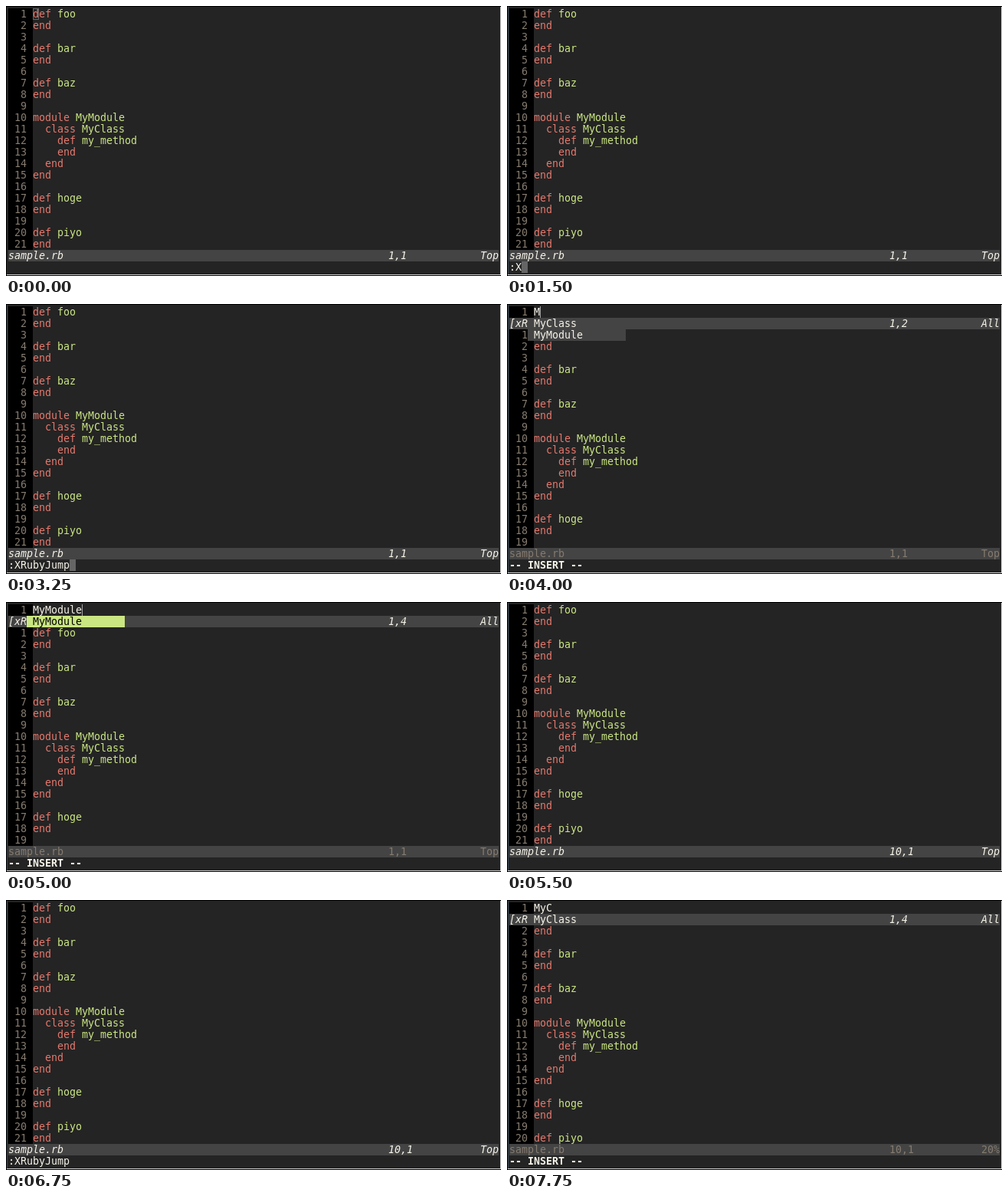
An HTML page with a canvas that plays this animation: 646x352 px, repeating every 8000 ms.

```html
<!DOCTYPE html>
<html lang="en">
<head>
<meta charset="utf-8">
<title>Jump to definition</title>
<style>
  html, body { margin: 0; width: 100%; height: 100%; overflow: hidden; background: #000; }
  canvas { display: block; }
</style>
</head>
<body>
<canvas id="stage" width="646" height="352"></canvas>
<script>
const ctx = document.getElementById('stage').getContext('2d');
const LOOP = 8000;
const CW = 8, CH = 15, PAD = 3, COLS = 80;
const FONT = '10pt "DejaVu Sans Mono", monospace';
const C = {
  bg: '#242424', fg: '#f6f3e8', gutter: '#000', num: '#857b6f', bar: '#444',
  key: '#e5786d', name: '#cae682', cursor: '#656565', beam: '#a5a5a5',
  edge: '#d8d8d8', focus: '#3c4a56', blur: '#2c2c2c'
};

const FILE = `def foo
end

def bar
end

def baz
end

module MyModule
  class MyClass
    def my_method
    end
  end
end

def hoge
end

def piyo
end`.split('\n');

const CMD = ':XRubyJump';

// Normal mode: command line text, cursor visibility, cursor line
const edit = (cmd, on = true, line = 1) => ({ cmd, on, line });
// Jump prompt: typed text, popup items, options
const jump = (text, items = [], opt = {}) =>
  ({ text, items, on: true, line: 1, col: text.length + 1, ...opt });

const STEPS = [
  [0, { ...edit(''), idle: true }],
  [500, edit('')],
  [1000, edit('', false)],
  [1250, edit(':')],
  [1500, edit(':X')],
  [1750, edit(':XR')],
  [2000, edit(':XRu')],
  [2250, edit(':XRub')],
  [2500, edit(':XRubyJ')],
  [2750, edit(':XRubyJum')],
  [3000, edit(CMD, false)],
  [3250, edit(CMD)],
  [3750, jump('')],
  [4000, jump('M', ['MyClass', 'MyModule'])],
  [4250, jump('My', ['MyClass', 'MyModule'])],
  [4500, jump('MyM', ['MyModule'])],
  [4750, jump('MyM', ['MyModule'], { on: false })],
  [5000, jump('MyModule', ['MyModule'], { picked: true, col: 4 })],
  [5250, edit('', true, 10)],
  [5500, edit('', false, 10)],
  [5750, edit(':', true, 10)],
  [6000, edit(CMD, false, 10)],
  [6250, edit(CMD, true, 10)],
  [6750, edit(CMD, false, 10)],
  [7000, jump('', [], { line: 10 })],
  [7250, jump('M', ['MyClass', 'MyModule'], { line: 10 })],
  [7500, jump('My', ['MyClass', 'MyModule'], { line: 10 })],
  [7750, jump('MyC', ['MyClass'], { line: 10, on: false })]
];

const X = col => PAD + col * CW;
const Y = row => PAD + row * CH;

function rect(x, y, w, h, color) {
  ctx.fillStyle = color;
  ctx.fillRect(x, y, w, h);
}

const box = (col, row, w, h, color) => rect(X(col), Y(row), w * CW, h * CH, color);

function print(col, row, text, color, style = '') {
  ctx.font = `${style} ${FONT}`;
  ctx.fillStyle = color;
  [...text].forEach((ch, i) => ch !== ' ' && ctx.fillText(ch, X(col + i), Y(row) + 12));
}

function lineNumber(row, n) {
  print(0, row, String(n).padStart(3), C.num);
}

function code(row, count, first) {
  for (let i = 0; i < count; i++) {
    const n = first + i;
    const [, indent, word, rest] = FILE[n - 1].match(/^( *)(\w*)(.*)$/);
    lineNumber(row + i, n);
    print(4 + indent.length, row + i, word, C.key);
    print(4 + indent.length + word.length, row + i, rest, C.name);
  }
}

function statusBar(row, title, pos, part, active) {
  const color = active ? C.fg : C.num;
  const style = active ? 'italic' : '';
  box(0, row, COLS, 1, C.bar);
  print(0, row, title, color, style);
  print(62, row, pos, color, style);
  print(77, row, part, color, style);
}

function popup(items, picked) {
  items.forEach((item, i) => {
    box(3, 1 + i, 16, 1, picked ? C.name : C.bar);
    print(4, 1 + i, item, picked ? '#000' : C.fg);
  });
}

function drawEdit(s) {
  const row = s.line - 1;
  if (s.on && !s.cmd && !s.idle) box(4, row, 1, 1, C.cursor);
  code(0, 21, 1);
  if (s.idle) {
    ctx.strokeStyle = C.cursor;
    ctx.strokeRect(X(4) + .5, Y(row) + .5, CW - 1, CH - 1);
  }
  statusBar(21, 'sample.rb', `${s.line},1`, 'Top', true);
  if (s.cmd) {
    print(0, 22, s.cmd, C.fg);
    if (s.on) box(s.cmd.length, 22, 1, 1, C.cursor);
  }
}

function drawJump(s) {
  const scrolled = s.line > 1;
  lineNumber(0, 1);
  print(4, 0, s.text, C.fg);
  if (s.on) rect(X(4 + s.text.length), Y(0), 1, CH, C.beam);
  code(2, 19, scrolled ? 2 : 1);
  statusBar(1, '[xRubyJump]', s.text ? `1,${s.col}` : '0,0-1', 'All', true);
  statusBar(21, 'sample.rb', `${s.line},1`, scrolled ? '20%' : 'Top', false);
  popup(s.items, s.picked);
  print(0, 22, '-- INSERT --', C.fg, 'bold');
}

function frame(idle) {
  rect(0, 0, 646, 352, '#000');
  rect(1, 1, 1, 349, idle ? C.blur : C.focus);
  rect(2, 1, 643, 349, C.bg);
  rect(645, 1, 1, 350, C.edge);
  rect(1, 350, 645, 1, C.edge);
  box(0, 0, 4, 21, C.gutter);
}

function draw(t) {
  let s = STEPS[0][1];
  for (const [at, state] of STEPS) if (t >= at) s = state;
  frame(s.idle);
  s.items ? drawJump(s) : drawEdit(s);
}

const start = performance.now();
function tick() {
  draw((performance.now() - start) % LOOP);
  requestAnimationFrame(tick);
}
tick();
</script>
</body>
</html>
```
